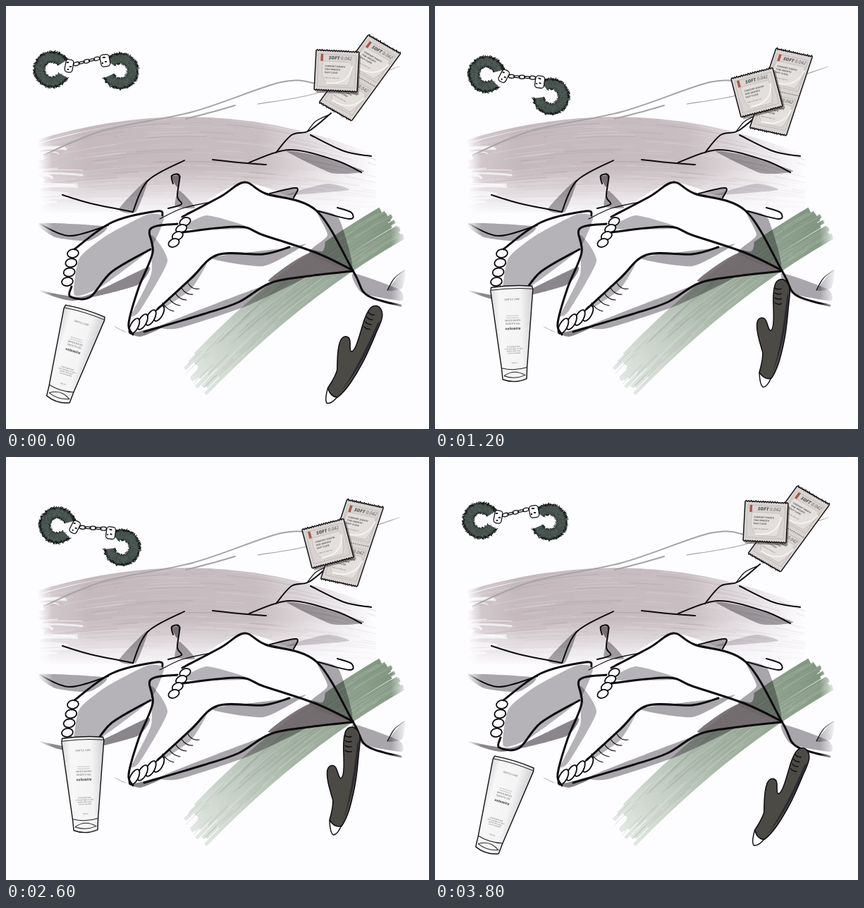
Write an HTML page that moves like this. It is 600x600 px and loops after 3900 ms.

```html
<!DOCTYPE html>
<html lang="en">
<head>
<meta charset="utf-8">
<style>
  html, body { margin: 0; height: 100%; overflow: hidden; background: #fdfcff; }
  svg { display: block; width: 100vw; height: 100vh; }
  .ink path { fill: none; stroke: #0c0a0c; stroke-width: 2; stroke-linecap: round; stroke-linejoin: round; }
  .ink .bold { stroke-width: 3; }
  .ink .fine { stroke-width: 1.2; }
  .ink .grey { stroke: #a5a3a6; }
  .shade path { fill: #aaa8ab; mix-blend-mode: multiply; }
  .shade .light { fill: #d5d3d6; }
  .shade .mid { fill: #b7b5b8; }
  .shade .dark { fill: #8b888b; }
  .shade .core { fill: #6f676b; fill-opacity: .9; mix-blend-mode: normal; }
  text { font-family: "Open Sans", Arial, sans-serif; fill: #555; }
</style>
</head>
<body>
<svg viewBox="0 0 600 600">
  <defs>
    <linearGradient id="mauve" gradientUnits="userSpaceOnUse" x1="45" x2="525">
      <stop offset="0" stop-color="#d6ccd0"/>
      <stop offset=".15" stop-color="#c5b9bd"/>
      <stop offset=".65" stop-color="#c8bdc1"/>
      <stop offset="1" stop-color="#fdfcff"/>
    </linearGradient>
    <linearGradient id="green" gradientUnits="userSpaceOnUse" x1="555" y1="300" x2="265" y2="535">
      <stop offset="0" stop-color="#809680"/>
      <stop offset=".5" stop-color="#a3b2a3"/>
      <stop offset="1" stop-color="#e2e8e3"/>
    </linearGradient>
    <linearGradient id="edges">
      <stop offset=".075" stop-color="#fdfcff"/>
      <stop offset=".11" stop-color="#fdfcff" stop-opacity="0"/>
      <stop offset=".91" stop-color="#fdfcff" stop-opacity="0"/>
      <stop offset=".95" stop-color="#fdfcff"/>
    </linearGradient>
    <linearGradient id="drop" x2="0" y2="1">
      <stop offset=".55" stop-color="#fff"/><stop offset="1" stop-color="#000"/>
    </linearGradient>
    <linearGradient id="plastic">
      <stop offset="0" stop-color="#d9d9db"/><stop offset=".2" stop-color="#f7f7f8"/>
      <stop offset=".7" stop-color="#f4f4f5"/><stop offset="1" stop-color="#cfcfd2"/>
    </linearGradient>
    <mask id="fall"><rect x="30" y="150" width="520" height="146" fill="url(#drop)"/></mask>
  </defs>

  <g id="mauveWash" mask="url(#fall)" fill="none"></g>
  <g id="greenWash" fill="none"></g>

  <path class="closed" fill="#fdfcff" data-p="236,338 255,298 338,250 440,290 448,348 345,315"/>

  <g class="shade">
    <path data-p="398,206 440,212 508,234 462,237"/>
    <path data-p="160,288 201,246 184,292"/>
    <path class="dark" data-p="235,242 248,241 243,257"/>
    <path data-p="246,262 268,286 240,284"/>
    <path class="light" data-p="398,268 455,252 486,261"/>
    <path class="mid" data-p="372,268 412,258 406,274"/>
    <path data-p="46,308 142,313 118,333 70,328"/>
    <path class="mid" data-p="200,296 224,300 203,346 132,400 97,410 104,358 142,326"/>
    <path class="dark" data-p="46,403 110,412 202,370 186,396 95,418"/>
    <path class="mid" data-p="206,325 229,362 190,432 178,438 206,380"/>
    <path class="dark" data-p="153,454 177,464 233,450 190,469"/>
    <path data-p="222,452 376,393 425,385 340,426 245,457"/>
    <path class="mid" data-p="215,432 285,362 262,402"/>
    <path class="mid" data-p="252,316 285,297 345,315"/>
    <path data-p="290,357 400,343 425,338 365,369"/>
    <path data-p="441,291 472,301 491,374 430,351 456,325"/>
    <path class="core" data-p="372,390 432,350 491,375 430,383"/>
    <path data-p="492,379 557,402 561,418 505,407"/>
    <path class="mid" data-p="541,403 566,374 562,400"/>
  </g>

  <g id="toes" fill="#fdfcff" stroke="#0c0a0c" stroke-width="1.8"></g>
  <g class="ink">
    <path class="grey" data-p="54,211 140,176 265,150 390,108 440,110"/>
    <path class="grey" data-p="255,160 290,151 325,141"/>
    <path class="grey fine" data-p="357,139 440,124 558,86"/>
    <path data-p="461,152 430,177 405,183 383,208"/>
    <path class="fine" data-p="459,154 440,163 428,177"/>
    <path data-p="432,183 480,206 518,213"/>
    <path data-p="293,218 330,222 369,225"/>
    <path data-p="345,222 402,204 468,219 504,236"/>
    <path data-p="180,292 201,248 253,219"/>
    <path data-p="237,252 235,241 246,241 243,270 249,281 230,287"/>
    <path data-p="80,268 120,280 180,292"/>
    <path data-p="48,309 90,326 145,311"/>
    <path data-p="408,272 412,258 374,266"/>
    <path data-p="440,290 487,302 490,293 470,286"/>

    <path class="bold" data-p="97,345 150,307 214,291 222,297"/>
    <path class="fine" data-p="218,302 250,287 290,278"/>
    <path class="bold" data-p="93,398 91,412 119,413 150,377 205,345"/>
    <path class="bold" data-p="243,309 205,316 208,350 188,400 174,450 180,466"/>
    <path class="bold" data-p="215,430 262,387 300,353 365,352 402,342"/>
    <path class="bold" data-p="196,462 280,437 330,420 375,393 430,383 492,376"/>
    <path class="bold" data-p="250,299 305,270 338,250 368,266 440,290 493,377 512,410 560,425"/>
    <path class="bold" data-p="250,321 330,313 365,325 440,350 492,375"/>
    <path class="fine" data-p="541,403 551,386 565,375"/>
    <g id="creases"></g>
  </g>
  <rect width="600" height="600" fill="url(#edges)"/>

  <g id="cuffs">
    <g id="fur" fill="none"></g>
    <g fill="#fff" stroke="#111" stroke-width="1.3">
      <rect x="84" y="76" width="11" height="18" rx="4" transform="rotate(10 90 85)"/>
      <rect x="134" y="69" width="13" height="17" rx="4" transform="rotate(-10 140 77)"/>
      <g id="chain" fill="none"></g>
      <path d="M86 80h3M90 86h3M87 90h2M137 73h4M140 79h3M136 81h2" stroke-width="1.8"/>
    </g>
  </g>

  <g id="packets"></g>

  <g id="tube"><g transform="translate(93 495.700) rotate(17)">
    <path d="M-29-66Q0-69 29-66L30-61 18 50 17 65Q0 72-17 65L-18 50-30-61Z" fill="url(#plastic)" stroke="#111" stroke-width="1.4" stroke-linejoin="round"/>
    <path d="M-29-62Q0-65 29-62M-18 49Q0 54 18 49M-15 60Q0 50 15 60Q0 66-15 60" fill="none" stroke="#222"/>
    <g id="label" text-anchor="middle"></g>
  </g></g>

  <g id="toy" stroke="#0e0d10" stroke-width="1.5" stroke-linejoin="round">
    <path d="M-11 58Q-8 76-3 78Q3 77 7 62Z" fill="#fff"/>
    <path d="M-5-67C-4-76 4-80 10-75C18-70 18-58 18-42C19-15 20 5 15 38Q12 55 7 64Q-2 68-11 58C-10 48-8 39-10 29C-15 17-22 4-23-8C-24-16-20-21-14-19C-9-17-7-4-3-3C1-4 0-17-2-30C-4-45-7-55-5-67Z" fill="#4c4a44"/>
    <path d="M16-60C19-20 18 20 6 62C12 40 15 0 14-55Z" fill="#2b2733" stroke="none"/>
    <path id="ridges" fill="none"/>
  </g>
</svg>
<script>
const $ = id => document.getElementById(id);
const add = (id, markup) => $(id).insertAdjacentHTML('beforeend', markup);
const mix = (a, b, u) => a + (b - a) * u;
const times = (n, fn) => Array.from({ length: n }, (_, i) => fn(i)).join('');

let seed = 7;
const rnd = (a, b) => {
  seed = seed * 16807 % 2147483647;
  return mix(a, b, seed / 2147483647);
};

// Curve through a few key points; closed shapes keep sharper corners
function smooth(points, closed) {
  const n = points.length, pull = closed ? .1 : 1 / 6;
  const at = i => points[closed ? (i + n) % n : Math.max(0, Math.min(n - 1, i))];
  let d = 'M' + points[0];
  for (let i = 0; i < (closed ? n : n - 1); i++) {
    const [p, a, b, q] = [at(i - 1), at(i), at(i + 1), at(i + 2)];
    d += 'C' + [0, 1].map(j => a[j] + (b[j] - p[j]) * pull) + ' ' +
      [0, 1].map(j => b[j] - (q[j] - a[j]) * pull) + ' ' + b;
  }
  return d;
}
for (const path of document.querySelectorAll('[data-p]')) {
  const points = path.dataset.p.split(' ').map(p => p.split(',').map(Number));
  path.setAttribute('d', smooth(points, path.matches('.closed, .shade path')));
}

// Brush washes: bristles side by side, s runs across the brush
function wash(id, bristles, bristle) {
  add(id, times(bristles, i =>
    `<path d="${bristle(i / (bristles - 1))}" stroke="url(#${id.replace('Wash', '')})" stroke-width="5"/>`));
  add(id, times(bristles * 2, i =>
    `<path d="${bristle(rnd(0, 1))}" stroke="${i % 2 ? '#776a70' : '#fff'}" stroke-width="${rnd(.5, 2)}"
      stroke-dasharray="${rnd(30, 110)} ${rnd(60, 300)}" stroke-dashoffset="${rnd(0, 300)}" opacity=".13"/>`));
}
wash('mauveWash', 46, s =>
  `M${rnd(42, 62)} ${193 + 98 * s}Q290 ${117 + 175 * s} 525 ${215 + 78 * s}`);
wash('greenWash', 26, s => {
  const x = mix(-15, 15, s), y = mix(-20, 20, s), end = rnd(-16, 16);
  return `M${548 + x + rnd(-10, 8)} ${308 + y}Q${400 + x} ${393 + y} ${280 + x + end} ${518 + y - end}`;
});
add('mauveWash', times(14, () =>
  `<path d="M40 ${rnd(200, 285)}q25 -4 ${rnd(25, 70)} ${rnd(-4, 4)}" stroke="#fdfcff" stroke-width="${rnd(1, 4)}" opacity=".7"/>`));

// Rows of toes from one end of the foot to the other
const toes = (n, [x0, y0], [x1, y1], rx, ry, turn) => add('toes', times(n, i => {
  const x = mix(x0, x1, i / (n - 1)), y = mix(y0, y1, i / (n - 1));
  return `<ellipse cx="${x}" cy="${y}" rx="${rx}" ry="${ry}" transform="rotate(${turn} ${x} ${y})"/>`;
}));
toes(4, [95, 351], [87, 391], 8, 6, -10);
toes(4, [217, 436], [182, 454], 5.5, 12, 28);
toes(4, [254, 306], [238, 336], 8, 5.5, -25);
add('creases', times(5, i =>
  `<path class="fine" d="M${222 + i * 9} ${421 - i * 7}q6 10 16 ${12 - i}"/>`));

// Furry cuffs: open rings, angles in degrees
function ring(cx, cy, from, to) {
  const spot = (deg, r) => {
    const a = deg * Math.PI / 180;
    return `${cx + r * Math.cos(a)} ${cy + r * Math.sin(a)}`;
  };
  const hairs = (n, r0, r1, length) => times(n, () => {
    const a = rnd(from, to), r = rnd(r0, r1);
    return `M${spot(a, r)}L${spot(a + rnd(-9, 9), r + length)}`;
  });
  add('fur', `<path d="M${spot(from, 18)}A18 18 0 1 1 ${spot(to, 18)}" stroke="#424d49" stroke-width="15"/>
    <path d="${hairs(170, 22, 25, 2.5)}${hairs(60, 10, 12, -1.5)}" stroke="#151a18"/>
    <path d="${hairs(200, 12, 22, 3)}" stroke="#56635d" stroke-width=".6"/>`);
}
ring(65, 90, 28, 328);
ring(162, 92, -140, 156);
add('chain', times(5, i => {
  const x = 100 + i * 7.2, y = 82 - i * 1.8;
  return `<ellipse cx="${x}" cy="${y}" rx="4.3" ry="${i % 2 ? 1.4 : 2.5}" transform="rotate(-14 ${x} ${y})"/>`;
}));

const text = (x, y, size, words, style = '') =>
  `<text x="${x}" y="${y}" font-size="${size}" ${style}>${words}</text>`;
const lines = (x, y, size, gap, words, style) =>
  words.map((line, i) => text(x, y + i * gap, size, line, style)).join('');

function foil(w, h) {
  const teeth = 18, step = w / teeth;
  const edge = dir => times(teeth, () => {
    const tip = rnd(1, 2);
    return `l${dir * step / 2} ${-dir * tip}l${dir * step / 2} ${dir * tip}`;
  });
  return `<path d="M${-w / 2} ${-h / 2}${edge(1)}v${h}${edge(-1)}Z" fill="#d9d4d1" stroke="#141214" stroke-width="1.5"/>`;
}
const print = (y, w) => `<g transform="translate(0 ${y})">
  <rect x="${-w / 2 + 4}" y="-23" width="${w - 8}" height="46" fill="none" stroke="#b9b3b1" stroke-width=".7"/>
  <path d="M-20-13H20Q25 0 17 20H-8Q-24 16-20-13Z" fill="#e3dfdc" stroke="#bdb7b4" stroke-width=".7"/>
  <path d="M-14 18Q18 20 22-8" fill="none" stroke="#f5f2f0" stroke-width="2"/>
  <rect x="${-w / 2 + 7}" y="-23" width="3.500" height="10" fill="#a9564a"/>
  ${text(-12, -16, 6.4, '<tspan font-weight="800">SOFT</tspan> 0.042', 'font-style="italic"')}
  ${lines(-17, -5, 3.2, 4.5, ['COMFORT SHEATH', 'FINE SMOOTH', 'EASY CLOSE'], 'font-weight="700"')}
  ${text(-17, 11, 2.2, 'single use, keep cool')}
</g>`;
add('packets', `
  <g transform="translate(502 102) rotate(30) skewX(-6)">${foil(53, 116)}${print(-29, 53)}${print(29, 53)}
    <path d="M-26 0H26" stroke="#777" stroke-dasharray="2 1"/></g>
  <g transform="translate(469 92) rotate(3)">
    <rect x="-28" y="-24" width="61" height="56" fill="#2a2628" opacity=".45"/>${foil(61, 55)}${print(0, 61)}</g>`);

add('label',
  text(0, -47, 3.4, 'GENTLE CARE') +
  '<path d="M-9-25H9M-9-22H9" stroke="#bbb" stroke-width=".8"/>' +
  lines(0, -17, 3.4, 4.5, ['WATER BASED', 'SMOOTH GEL']) +
  text(0, -5, 5, 'velumira', 'font-weight="800" font-style="italic"') +
  lines(0, 20, 2.6, 3, ['FOR EVERY DAY', 'soft and light on skin', 'gentle and clear', 'use as needed']) +
  text(0, 43, 2.6, '100 ml'));

$('ridges').setAttribute('d', times(4, i => `M${i - 5} ${i * 7 - 64}q5 3 10 0`));

function place(id, [x0, y0], [x1, y1], turn, u) {
  $(id).setAttribute('transform',
    `translate(${mix(x0, x1, u)} ${mix(y0, y1, u)}) rotate(${turn * u}) translate(${-x0} ${-y0})`);
}

function draw(now) {
  const step = Math.floor(now % 3900 / 100);
  const u = 1 - Math.abs(step - 19) / 19;
  place('cuffs', [113.5, 90.5], [122, 124.5], 28, u);
  place('packets', [498.5, 102.5], [481.5, 136], -28, u);
  place('tube', [93, 495.7], [121.3, 445.8], -30, u);
  // The toy comes back to a slightly higher spot than it left
  const [x, y] = step > 19 ? [488, 481.5] : [491, 494];
  $('toy').setAttribute('transform',
    `translate(${mix(x, 471, u)} ${mix(y, 446, u)}) rotate(${28 * (1 - u) - 3})`);
  requestAnimationFrame(draw);
}
draw(performance.now());
</script>
</body>
</html>
```
